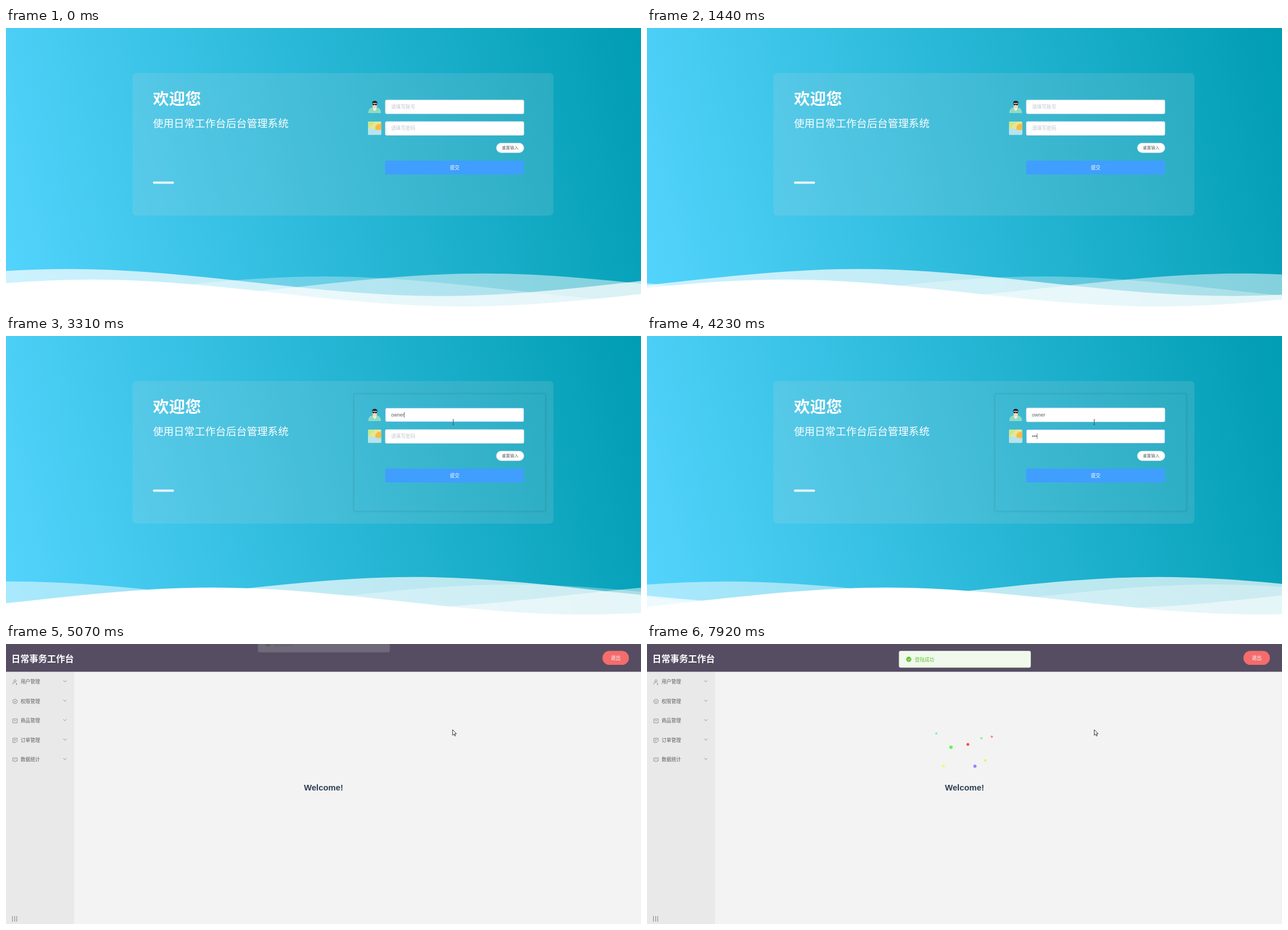
An HTML page that plays this animation: 1128x497 px, repeating every 8000 ms.

```html
<!DOCTYPE html>
<html lang="zh-CN">
<head>
<meta charset="utf-8">
<title>Login and welcome</title>
<style>
  html, body { margin: 0; width: 100%; height: 100%; overflow: hidden; }
  #stage { display: block; width: 1128px; height: 497px;
    background: linear-gradient(76deg, #54d4fd, #009db3);
    font-family: "Noto Sans CJK SC", "Noto Sans CJK", sans-serif; font-size: 8.6px; }
  .latin { font-family: "Liberation Sans", Arial, sans-serif; }
  .hover { filter: drop-shadow(0 1px 2px rgba(0, 0, 0, .25)); }
  .hint { fill: #c0c4cc; }
  .typed { fill: #606266; }
  .mid { text-anchor: middle; }
  .icon { fill: none; stroke: #7d7d82; stroke-width: .8; stroke-linejoin: round; }
</style>
</head>
<body>
<svg id="stage" viewBox="0 0 1128 497">
  <defs>
    <path id="wave" d="M-160 44c30 0 58-18 88-18s58 18 88 18 58-18 88-18 58 18 88 18v44h-352z"/>
    <clipPath id="tile"><rect x="643" y="166" width="23.5" height="23.5" rx="1.5"/></clipPath>
  </defs>

  <g id="login">
    <rect x="224.5" y="80" width="748" height="253" rx="7" fill="#d7d7d7" fill-opacity=".15"/>
    <g fill="#fff">
      <text x="261" y="135.8" font-size="28.5" font-weight="700">欢迎您</text>
      <text x="261" y="176" font-size="18.55">使用日常工作台后台管理系统</text>
      <rect x="261" y="272.5" width="37.5" height="4" rx="2" fill-opacity=".87"/>
    </g>
    <g id="hover" fill="none" stroke="#000" stroke-opacity=".06" stroke-width="1.5">
      <rect x="618" y="102.5" width="340.5" height="208.5" rx="3"/>
      <rect x="617" y="101.5" width="342.5" height="211" rx="4" stroke-opacity=".025" stroke-width="4"/>
    </g>

    <!-- account icon -->
    <path d="M643.5 151c0-7 3.5-9.5 8.500-10h6c5 .5 8 3 8 10z" fill="#8fdcc3"/>
    <path d="M651.500 140.500h7l-1 4-2.500 3-2.500-3z" fill="#f7f1e9"/>
    <path d="M651 132.500h8v5c0 3.500-2 5.500-4 5.500s-4-2-4-5.500z" fill="#f5d8bd"/>
    <path d="M650.500 135c-.8-4 1.500-5.500 4.500-5.500s5.500 1.500 4.500 5.500l-1-2h-7z" fill="#1b1b1f"/>
    <path d="M651 134.500h8v1.800q-2 2.200-3.500 0h-1q-1.500 2.200-3.500 0z" fill="#222"/>
    <!-- password icon -->
    <g clip-path="url(#tile)">
      <path d="M643 166h24v24h-24z" fill="#e4e793"/>
      <path d="M643 166h13l-13 13z" fill="#c9e88f"/>
      <circle cx="664" cy="178" r="8" fill="#fbb946"/>
      <path d="M643 179c7-3 11 3 24 2v9h-24z" fill="#b6e4ef"/>
    </g>

    <g fill="#fff" stroke="#dcdfe6" stroke-width=".7">
      <rect id="accountBox" x="673.8" y="127.800" width="246.200" height="24.500" rx="2.200"/>
      <rect id="passwordBox" x="673.8" y="166" width="246.200" height="24.500" rx="2.200"/>
      <rect x="871" y="204.300" width="49" height="17" rx="8.500"/>
    </g>
    <text id="accountHint" class="hint" x="684" y="143.300">请填写账号</text>
    <text id="passwordHint" class="hint" x="684" y="181.300">请填写密码</text>
    <text id="account" class="latin typed" x="684" y="143"></text>
    <text id="password" class="latin typed" x="684" y="181"></text>
    <rect id="caret" width=".8" height="10" fill="#555"/>
    <text class="typed mid" x="895.500" y="215.300" font-size="7.4">重置输入</text>
    <rect x="673.5" y="235.500" width="246.500" height="24.500" rx="2.200" fill="#409eff"/>
    <text class="mid" x="797" y="251" fill="#fff">提交</text>

    <svg y="422.45" width="1128" height="74.55" viewBox="0 24 150 28" preserveAspectRatio="none" fill="#fff">
      <use href="#wave" y="0" fill-opacity=".7"/>
      <use href="#wave" y="3" fill-opacity=".5"/>
      <use href="#wave" y="5" fill-opacity=".3"/>
      <use href="#wave" y="7"/>
    </svg>
    <path id="beam" d="M793 148.500q1.500 0 1.500 1v7q0 1-1.500 1m3-9q-1.500 0-1.500 1m0 7q0 1 1.500 1" fill="none" stroke="#444" stroke-width=".9"/>
  </g>

  <g id="dashboard">
    <rect width="1128" height="497" fill="#f3f3f3"/>
    <rect y="49" width="121" height="448" fill="#e9e9e9"/>
    <rect width="1128" height="49.300" fill="#564d63"/>
    <text x="9.500" y="32" fill="#fff" font-size="15.9" font-weight="700">日常事务工作台</text>
    <rect x="1059.500" y="12.300" width="47" height="24.700" rx="12.300" fill="#f56c6c"/>
    <text class="mid" x="1083" y="28" fill="#fff">退出</text>
    <g id="menu"></g>
    <text class="latin" x="10" y="490.500" font-size="10" letter-spacing="1.300" fill="#75665f">|||</text>
    <text class="latin mid" x="564" y="259.700" font-size="14.8" font-weight="700" fill="#2c3e50">Welcome!</text>
    <g id="dots"></g>
    <g id="message">
      <rect x="447.800" y="12.500" width="233.700" height="29.200" rx="2.400" fill="#f0f9eb" stroke="#e1f3d8" stroke-width=".6"/>
      <circle cx="465" cy="27.200" r="4.600" fill="#67c23a"/>
      <path d="M462.700 27.300l1.700 1.700 3-3.200" fill="none" stroke="#fff" stroke-width=".9"/>
      <text x="475.800" y="30.500" fill="#67c23a">登陆成功</text>
    </g>
    <path id="arrow" d="M793.300 152v10l2.300-2.100 1.600 3.500 1.500-.7-1.600-3.400h3.100z" fill="#fff" stroke="#222" stroke-width=".9"/>
  </g>
</svg>

<script>
const LOOP = 8000, LOGGED_IN = 5065;
const el = id => document.getElementById(id);
const show = (id, on) => el(id).setAttribute("visibility", on ? "visible" : "hidden");
const clamp = v => Math.min(1, Math.max(0, v));

function add(parent, name, attrs, text = "") {
  const node = document.createElementNS("http://www.w3.org/2000/svg", name);
  for (const key in attrs) node.setAttribute(key, attrs[key]);
  node.textContent = text;
  return parent.appendChild(node);
}

// CSS-style cubic-bezier easing, solved by bisection
function bezier(x1, y1, x2, y2) {
  const at = (a, b, s) => 3 * a * s * (1 - s) ** 2 + 3 * b * s * s * (1 - s) + s ** 3;
  return x => {
    let low = 0, high = 1;
    for (let i = 0; i < 24; i++) {
      const s = (low + high) / 2;
      if (at(x1, x2, s) < x) low = s; else high = s;
    }
    return at(y1, y2, low);
  };
}
const drift = bezier(.55, .5, .45, .5);
const ease = bezier(.25, .1, .25, 1);

// icons are drawn around their own centre
const menu = [
  ["用户管理", "M-2-2a2 2 0 1 0 4 0a2 2 0 1 0-4 0M-3.8 4.300v-1.300q0-2.500 2.600-2.500h2M2.700 1.500v2.800M1.500 4.300h2.500"],
  ["权限管理", "M0-4.300l3.800 2.100v4.400l-3.800 2.100-3.800-2.100v-4.400zM-2-1.200l2 1.300 2-1.300M0 .1v2.400"],
  ["商品管理", "M-3.900-3.500h7.800v7h-7.800zM-2-1.200q2 2.500 4 0"],
  ["订单管理", "M-3.800-3.800h7.600v5l-2.600 2.600h-5zM-2-1.300h4M-2 .8h2.500"],
  ["数据统计", "M-4-3.300h8v5.500h-2.800l-1.200 1.500-1.200-1.500h-2.800zM-2-.6h1M-.4-.6h1M1.200-.6h1"]
];
menu.forEach(([label, icon], i) => {
  const row = add(el("menu"), "g", { transform: `translate(0 ${67 + 34.5 * i})` });
  add(row, "path", { class: "icon", d: icon, transform: "translate(16 .5)" });
  add(row, "text", { x: 26, y: 3.3, fill: "#5d5d60" }, label);
  add(row, "path", { class: "icon", d: "M101.800-2.300l2.800 2.600 2.800-2.600" });
});

// x, radius, colour, start in ms, speed factor
const dots = [
  [514, 2, "#6eeee6", 6050, 1], [612.5, 2, "#ff8585", 6250, 1.02],
  [594, 2, "#83f286", 6345, 1.03], [570, 2.5, "#f8475a", 6560, 1],
  [540, 3, "#5cf652", 6680, 1], [601, 2.4, "#eef06a", 7200, 1],
  [526.5, 2.8, "#f4f590", 7400, 1], [582.5, 2.9, "#8b8bfa", 7400, 1]
].map(([cx, r, fill, start, speed]) =>
  ({ node: add(el("dots"), "circle", { cx, r, fill }), start, speed }));

const waves = [...document.querySelectorAll("use")];
const periods = [7, 10, 13, 20];

function drawWaves(t) {
  const seconds = 10.05 + Math.floor(t / 117.4) * .1221;
  waves.forEach((wave, i) => {
    const phase = (seconds + 2 + i) / periods[i] % 1;
    wave.setAttribute("x", 48 - 90 + 175 * drift(phase));
  });
}

function typed(t, text, start, step) {
  return text.slice(0, Math.max(0, Math.floor((t - start) / step) + 1));
}

function drawForm(t) {
  const inPassword = t >= 3540;
  const account = typed(t, "owner", 2725, 118);
  const password = typed(t, "••••••", 3870, 121);
  el("account").textContent = account;
  el("password").textContent = password;
  show("accountHint", !account);
  show("passwordHint", !password);
  el("accountBox").setAttribute("stroke", t > 2550 && !inPassword ? "#409eff" : "#dcdfe6");
  el("passwordBox").setAttribute("stroke", inPassword ? "#409eff" : "#dcdfe6");

  const field = inPassword ? el("password") : el("account");
  el("caret").setAttribute("x", 683.6 + (field.textContent ? field.getComputedTextLength() : 0));
  el("caret").setAttribute("y", inPassword ? 173 : 135);
  show("caret", t >= 2480);
  show("beam", t >= 2250);
  el("hover").setAttribute("opacity", clamp((t - 2200) / 200));
}

function drawDashboard(t) {
  const since = t - 5030;
  const slide = ease(clamp(since / 400));
  el("message").setAttribute("transform", `translate(0 ${-30 * (1 - slide)})`);
  el("message").setAttribute("opacity", ease(clamp(since / 300)));
  for (const { node, start, speed } of dots) {
    const u = (t - start) / 1000;
    node.setAttribute("cy", 245 - speed * (57.3 * u - 6 * u * u));
    node.setAttribute("opacity", u >= 0 ? 1 : 0);
  }
  el("arrow").setAttribute("transform", `translate(${t >= 7795 ? 1.2 : 0} 0)`);
}

function draw(now) {
  const t = now % LOOP, loggedIn = t >= LOGGED_IN;
  el("login").style.display = loggedIn ? "none" : "";
  el("dashboard").style.display = loggedIn ? "" : "none";
  if (loggedIn) drawDashboard(t);
  else { drawWaves(t); drawForm(t); }
  requestAnimationFrame(draw);
}
draw(performance.now());
</script>
</body>
</html>
```
